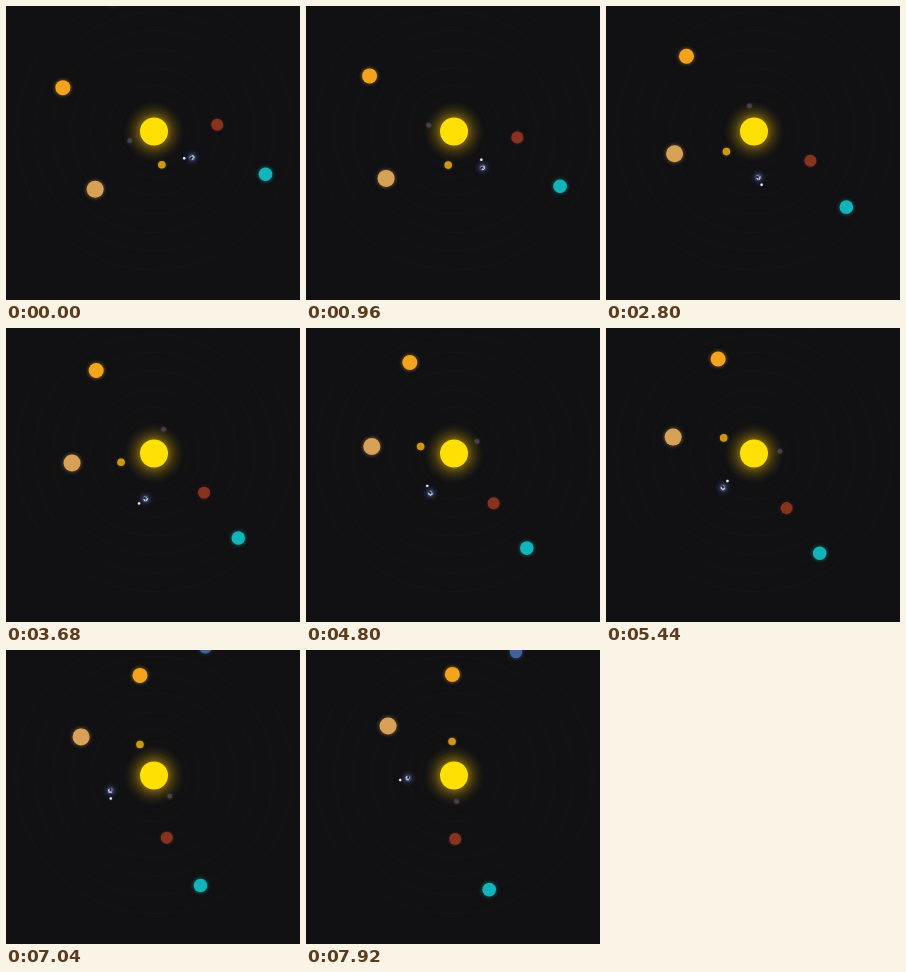
These frames come from a looping animation (294 px wide and 294 px high, 8000 ms). An HTML page with a canvas:

```html
<!DOCTYPE html>
<html lang="en">
<head>
<meta charset="utf-8">
<title>Planets</title>
<style>
  html, body { margin: 0; width: 100%; height: 100%; overflow: hidden; background: #111113; }
  canvas { display: block; width: 294px; height: 294px; }
</style>
</head>
<body>
<canvas id="stage"></canvas>
<script>
const SIZE = 294, LOOP = 8000, STEP = 80;
const SUN = { x: 148, y: 125.5 };

// orbit radius, start angle (deg), period (s), body radius, colour, glow rgb, glow width, glow strength
const planets = [
  [26, 159.3, 10, 2.4, '#493f4a', '120,85,105', 3, .25],
  [34.1, 76.7, 15, 3.8, '#cd9914', '205,153,20', 3, .28],
  [63.6, -6.1, 30, 6, '#873320', '150,55,35', 3, .28],
  [82.5, 135.5, 35, 8.5, '#d7a257', '215,162,87', 4.5, .32],
  [101.1, 205.7, 45, 7.5, '#f1a41c', '241,164,28', 4.5, .32],
  [119.4, 21, 55, 6.8, '#12b4b9', '18,180,185', 4.5, .32],
  [138.2, 252.8, 65, 6.3, '#40609f', '64,96,159', 5, .3]
];
const earth = { orbit: 46.1, start: 34.2, period: 20 };
const moon = { orbit: 8, start: 174, period: 4 };

const canvas = document.getElementById('stage');
const ctx = canvas.getContext('2d');
const scale = window.devicePixelRatio || 1;
canvas.width = canvas.height = SIZE * scale;
ctx.scale(scale, scale);

const angleAt = (start, period, t) => (start + 360 * t / period) * Math.PI / 180;
const around = (c, r, a) => ({ x: c.x + r * Math.cos(a), y: c.y + r * Math.sin(a) });

function disc(p, r, fill) {
  ctx.fillStyle = fill;
  ctx.beginPath();
  ctx.arc(p.x, p.y, r, 0, Math.PI * 2);
  ctx.fill();
}

function glow(p, r, width, rgb, strength) {
  const g = ctx.createRadialGradient(p.x, p.y, r, p.x, p.y, r + width);
  g.addColorStop(0, `rgba(${rgb},${strength})`);
  g.addColorStop(.35, `rgba(${rgb},${strength * .45})`);
  g.addColorStop(.7, `rgba(${rgb},${strength * .12})`);
  g.addColorStop(1, `rgba(${rgb},0)`);
  disc(p, r + width, g);
}

function ring(r) {
  ctx.strokeStyle = 'rgba(255,255,255,.016)';
  ctx.lineWidth = 1;
  ctx.beginPath();
  ctx.arc(SUN.x, SUN.y, r, 0, Math.PI * 2);
  ctx.stroke();
}

function patch(x, y, rx, ry, turn, fill) {
  ctx.fillStyle = fill;
  ctx.beginPath();
  ctx.ellipse(x, y, rx, ry, turn, 0, Math.PI * 2);
  ctx.fill();
}

function drawEarth(t) {
  const a = angleAt(earth.start, earth.period, t);
  const p = around(SUN, earth.orbit, a);
  glow(p, 3.2, 5.5, '70,85,170', .38);
  disc(p, 3.6, '#333c55');
  ctx.save();
  ctx.translate(p.x, p.y);
  ctx.rotate(a);
  patch(.7, -1.3, 2, .9, .4, '#b9c1d0');
  patch(1.3, 1, 1.3, .8, -.7, '#d3d9e2');
  patch(-1.6, .3, .7, 1.6, .2, '#8c97ac');
  patch(-.4, .8, .8, .9, 0, '#151a28');
  ctx.restore();
  const m = around(p, moon.orbit, angleAt(moon.start, moon.period, t));
  glow(m, 1, 1.6, '200,205,255', .25);
  disc(m, 1.2, '#f0f0f4');
}

function draw(t) {
  ctx.fillStyle = '#111113';
  ctx.fillRect(0, 0, SIZE, SIZE);
  ring(earth.orbit);
  planets.forEach(([orbit]) => ring(orbit));

  glow(SUN, 13.5, 17, '255,200,0', .42);
  disc(SUN, 14, '#fee004');

  for (const [orbit, start, period, r, fill, rgb, width, strength] of planets) {
    const p = around(SUN, orbit, angleAt(start, period, t));
    glow(p, r - .5, width, rgb, strength);
    disc(p, r, fill);
  }
  drawEarth(t);
}

const begin = performance.now();
function frame() {
  const ms = (performance.now() - begin) % LOOP;
  draw(Math.floor(ms / STEP) * STEP / 1000);
  requestAnimationFrame(frame);
}
frame();
</script>
</body>
</html>
```
